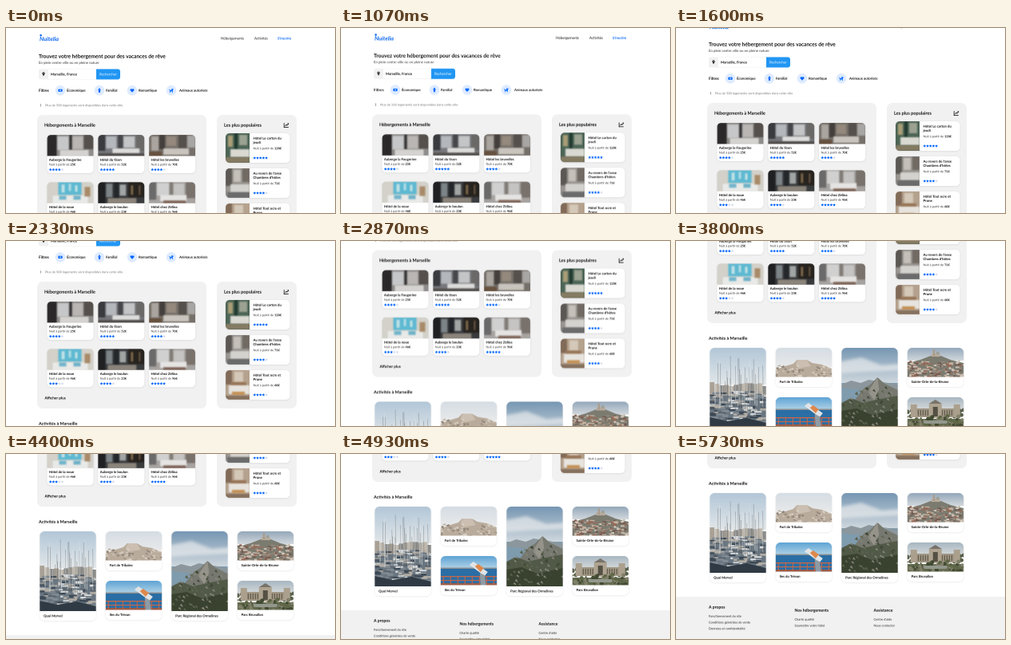
These frames come from a looping animation (412 px wide and 232 px high, 5990 ms). An HTML page with a canvas:

```html
<!DOCTYPE html>
<html lang="fr">
<head>
<meta charset="utf-8">
<title>Hébergements</title>
<style>
html, body { margin: 0; width: 100%; height: 100%; overflow: hidden; background: #fff; }
canvas { display: block; width: 412px; height: 232px; }
</style>
</head>
<body>
<canvas id="stage"></canvas>
<script>
const W = 412, H = 232, PAGE_H = 482, SCALE = 4, LOOP = 5990, STEP = 1000 / 15;
const BLUE = '#0065fc', PALE = '#deebff', GREY = '#f1f1f1', INK = '#111';

const page = document.createElement('canvas');
page.width = W * SCALE;
page.height = PAGE_H * SCALE;
const g = page.getContext('2d');
g.scale(SCALE, SCALE);

// --- helpers ---
function text(str, x, y, size = 4.3, weight = 700, color = INK, style = '') {
  g.font = `${style} ${weight} ${size}px Lato, sans-serif`;
  g.fillStyle = color;
  g.fillText(str, x, y + size * 0.33);
  return x + g.measureText(str).width;
}

function rect(color, x, y, w, h) {
  g.fillStyle = color;
  g.fillRect(x, y, w, h);
}

function round(color, x, y, w, h, r) {
  g.fillStyle = color;
  g.beginPath();
  g.roundRect(x, y, w, h, r);
  g.fill();
}

function disc(color, x, y, r) {
  g.fillStyle = color;
  g.beginPath();
  g.arc(x, y, r, 0, Math.PI * 2);
  g.fill();
}

function poly(color, ...p) {
  g.fillStyle = color;
  g.beginPath();
  for (let i = 0; i < p.length; i += 2) g.lineTo(p[i], p[i + 1]);
  g.fill();
}

function line(color, width, ...p) {
  g.strokeStyle = color;
  g.lineWidth = width;
  g.beginPath();
  for (let i = 0; i < p.length; i += 2) g.lineTo(p[i], p[i + 1]);
  g.stroke();
}

function sky(top, bottom, w, h) {
  const grad = g.createLinearGradient(0, 0, 0, h);
  grad.addColorStop(0, top);
  grad.addColorStop(1, bottom);
  rect(grad, 0, 0, w, h);
}

function card(x, y, w, h, r = 5) {
  g.save();
  g.shadowColor = 'rgba(0,0,0,.1)';
  g.shadowBlur = 2 * SCALE;
  g.shadowOffsetY = 0.5 * SCALE;
  round('#fff', x, y, w, h, r);
  g.restore();
}

function photo(x, y, w, h, radii, paint) {
  g.save();
  g.translate(x, y);
  g.beginPath();
  g.roundRect(0, 0, w, h, radii);
  g.clip();
  paint(w, h);
  g.restore();
}

// Interiors are soft-edged blocks on a base tone.
const room = (base, ...blocks) => (w, h) => {
  rect(base, 0, 0, w, h);
  g.filter = 'blur(3px)';
  for (const b of blocks) rect(...b);
};

function seeded(seed) {
  return () => (seed = (seed * 16807) % 2147483647) / 2147483647;
}

function stars(x, y, count) {
  for (let i = 0; i < 5; i++) {
    const pts = [];
    for (let k = 0; k < 10; k++) {
      const a = k * Math.PI / 5 - Math.PI / 2, r = k % 2 ? 0.95 : 1.95;
      pts.push(x + 1.8 + i * 3.7 + Math.cos(a) * r, y + Math.sin(a) * r);
    }
    poly(i < count ? BLUE : '#d5dcea', ...pts);
  }
}

function price(x, y, amount) {
  const end = text('Nuit à partir de ', x, y, 3.85, 400, '#333');
  text(amount + '€', end, y, 3.85);
}

// --- rooms ---
const hotels = [
  ['Auberge la Fougerine', 25, 4, room('#8f8d8b', ['#2a2828', 0, 0, 12, 27], ['#c6c7c8', 13, 2, 14, 17],
    ['#343233', 28, 0, 3, 19], ['#b9b6b3', 32, 2, 13, 16], ['#55504c', 46, 0, 12, 18], ['#d5d3d0', 16, 19, 36, 8])],
  ['Hôtel du tison', 52, 5, room('#77797d', ['#3a3b3f', 0, 0, 9, 20], ['#b4b7bb', 10, 2, 13, 15],
    ['#46474b', 25, 0, 6, 18], ['#c4c5c6', 32, 2, 14, 14], ['#6b6968', 48, 0, 10, 20], ['#dcdcdb', 18, 17, 34, 7], ['#54504e', 0, 23, 58, 4])],
  ['Hôtel les bruvelles', 70, 4, room('#76706a', ['#aaa59f', 3, 2, 9, 18], ['#443f3c', 13, 0, 7, 18],
    ['#94897c', 22, 2, 12, 12], ['#55504c', 37, 0, 10, 17], ['#a7a6a4', 48, 1, 10, 15], ['#c9c4bd', 18, 17, 32, 8], ['#67513f', 0, 21, 16, 6])],
  ['Hôtel de la noue', 46, 3, room('#d3d1c9', ['#5eb9d2', 14, 0, 29, 16], ['#bfe1e6', 18, 3, 4, 10],
    ['#b4dde5', 27, 2, 3, 9], ['#c8e4e6', 35, 4, 3, 8], ['#e9eae8', 7, 17, 44, 10], ['#73b5cc', 15, 17, 9, 5], ['#71b2c8', 33, 17, 9, 5], ['#a88b69', 47, 6, 7, 12])],
  ['Auberge le boulon', 23, 4, room('#393b3d', ['#1e2022', 0, 0, 9, 27], ['#7c8487', 10, 2, 8, 17],
    ['#24272a', 20, 0, 6, 23], ['#a1a5a4', 27, 3, 8, 14], ['#27231f', 38, 0, 20, 19], ['#7b664a', 41, 4, 3, 12], ['#695643', 51, 4, 2, 12], ['#8b847b', 12, 20, 36, 7])],
  ['Hôtel chez Zélina', 96, 5, room('#a6a3a0', ['#6b6a6a', 0, 0, 9, 22], ['#d0d0d0', 10, 1, 15, 16],
    ['#817b76', 26, 0, 4, 18], ['#c5c4c3', 31, 2, 13, 14], ['#79716b', 46, 0, 12, 20], ['#e5e4e2', 14, 16, 33, 8], ['#81675b', 18, 23, 28, 4])]
];

const popular = [
  ['Hôtel Le carton du', 'jeudi', 128, 5, room('#4d6556', ['#a89d77', 3, 3, 6, 14], ['#223a30', 11, 0, 4, 20],
    ['#9ba292', 17, 2, 10, 13], ['#d9d9d2', 6, 20, 24, 10], ['#857b63', 0, 30, 30, 7])],
  ["Au revers de l'anse", "Chambres d'hôtes", 71, 4, room('#98948f', ['#5b5753', 0, 0, 8, 22], ['#c4c0ba', 10, 2, 9, 15],
    ['#716a63', 21, 0, 9, 17], ['#d4d2ce', 6, 20, 24, 10], ['#6b6b6c', 2, 30, 28, 7])],
  ['Hôtel Tout ocre et', 'Prune', 68, 4, room('#b5a28e', ['#816a57', 0, 0, 8, 18], ['#d4c8b8', 11, 2, 11, 13],
    ['#987557', 6, 15, 20, 5], ['#e7e4df', 4, 19, 26, 11], ['#c49054', 8, 27, 16, 4], ['#85705d', 0, 32, 30, 5])]
];

// --- landscapes ---
function harbour(w, h) {
  const rnd = seeded(71);
  sky('#b3c7d8', '#e2e7e9', w, 46);
  rect('#697681', 0, 48, w, h);
  for (let x = 0; x < w; x += 6) {
    const top = 43 + rnd() * 6;
    rect(['#a9a196', '#c0b8ac', '#8d8c89'][x % 18 / 6], x, top, 6, 60 - top);
  }
  for (let i = 0; i < 150; i++) {
    const y = 54 + i * 0.28, len = 4 + rnd() * 9;
    round(['#d6d9da', '#818b93', '#3c4854', '#b2ada5', '#59636c'][i % 5], rnd() * 76 - 6, y, len, 1.4 + rnd() * 2, 1);
  }
  for (let i = 0; i < 42; i++) {
    const x = rnd() * w, top = 10 + rnd() * 36;
    line(i % 2 ? '#dfe2e3' : '#747b80', 0.4, x, top, x + 0.5, 66 + rnd() * 14);
  }
  poly('#303a44', 0, 87, 22, 92, 46, 88, w, 94, w, h, 0, h);
}

function rocks(w, h) {
  const rnd = seeded(19);
  sky('#d5dde4', '#e9eaeb', w, 24);
  poly('#b9ab9b', 0, 27, 12, 23, 22, 20, 27, 15, 39, 15, 46, 19, 58, 21, 70, 26, 70, h, 0, h);
  poly('#cbbfb2', 25, 20, 28, 15, 39, 15, 44, 23, 28, 26);
  for (let i = 0; i < 70; i++) {
    const x = rnd() * 76 - 4, y = 22 + rnd() * 15;
    poly(['#d8cfc4', '#918679', '#bfb2a3'][i % 3], x, y, x + 2 + rnd() * 3, y - 1, x + 4, y + 2);
  }
}

function lookout(w, h) {
  sky('#5fa4d6', '#b3d4e6', w, 16);
  rect('#8b8f91', 0, 14.5, w, 1.7);
  rect('#2a6ea5', 0, 16, w, 21);
  rect('#cb6746', 0, 25, w, 1.3);
  rect('#cb6746', 0, 30, w, 1.1);
  rect('#9b5a45', 0, 34, w, 3);
  for (let x = 3; x < w; x += 9) rect('#cb6746', x, 25, 1, 10);
  poly('#e1e4e6', 36, 11, 41, 7, 59, 20, 55, 25);
  poly('#de884c', 43, 13, 47, 10, 54, 15, 50, 20);
  poly('#8f9ba3', 49, 21, 55, 24, 57, h, 50, h);
}

function cliffs(w, h) {
  const rnd = seeded(43);
  sky('#7797b3', '#d3dbe0', w, 46);
  g.save();
  g.filter = 'blur(8px)';
  poly('rgba(232,235,237,.7)', -5, 18, 25, 12, 50, 22, 75, 20, 75, 28, 30, 30, -5, 32);
  g.restore();
  sky('#8fa8b8', '#8fa8b8', 0, 0);
  rect('#7f9bae', 0, 44, w, h);
  poly('#8b979d', 0, 46, 12, 41, 24, 44, 34, 40, w, 46, w, 58, 0, 50);
  poly('#777970', 16, 66, 27, 52, 36, 46, 45, 37, 54, 45, w, 53, w, h, 10, h);
  poly('#95938a', 33, 55, 45, 37, 47, 52, 41, 66);
  poly('#515947', 0, 69, 12, 63, 27, 69, 44, 65, w, 60, w, h, 0, h);
  poly('#39422f', 0, 79, 19, 76, 38, 84, w, 77, w, h, 0, h);
  for (let i = 0; i < 80; i++) {
    const y = 50 + rnd() * 49, left = Math.max(0, 72 - y), x = left + rnd() * (w - left);
    poly(['#3e4733', '#85857a', '#5d6450'][i % 3], x, y, x + 2, y - 2, x + 4, y + 2);
  }
}

function basilica(w, h) {
  const rnd = seeded(87);
  sky('#94a8bb', '#d2d8dd', w, 16);
  poly('#7b7b70', 0, 19, 16, 15, 29, 10, 42, 10, 54, 15, w, 19, w, h, 0, h);
  rect('#b9ac9c', 30, 7, 11, 4);
  rect('#a99c8d', 32, 2, 2.5, 8);
  disc('#9ca09a', 38, 6.5, 2);
  for (let i = 0; i < 150; i++) {
    const y = 16 + i * 0.14, x = rnd() * 74 - 4;
    rect(['#956b59', '#c5b4a3', '#70564d', '#a18d80', '#d3c8bd'][i % 5], x, y, 2 + rnd() * 4, 1 + rnd() * 1.6);
  }
}

function palace(w, h) {
  const rnd = seeded(55);
  sky('#a8b7c2', '#dcdfdf', w, 18);
  for (let i = 0; i < 30; i++) disc('#59604b', rnd() * w, 16 + rnd() * 8, 2.5);
  rect('#9f9582', 5, 14, 60, 11);
  for (let x = 7; x < 64; x += 3) rect('#645e4f', x, 16, 1.2, 7);
  rect('#aea390', 27, 8, 16, 18);
  poly('#78736a', 27, 8, 35, 3, 43, 8);
  rect('#545044', 32, 12, 6, 12);
  rect('#aba08d', 4, 9, 8, 16);
  rect('#aba08d', 58, 9, 8, 16);
  rect('#666c51', 0, 27, w, 10);
  for (let i = 0; i < 60; i++) {
    disc(['#424b33', '#5d6646', '#81806a'][i % 3], rnd() * w, 23 + rnd() * 13, 1 + rnd() * 1.8);
  }
  round('#93988d', 20, 29, 30, 4, 2);
}

// --- icons ---
function pin(x, y) {
  disc(INK, x, y - 0.8, 1.6);
  poly(INK, x - 1.5, y - 0.3, x + 1.5, y - 0.3, x, y + 2.6);
  disc(GREY, x, y - 0.8, 0.6);
}

const icons = [
  (x, y) => {
    round(BLUE, x - 2.6, y - 1.6, 5.2, 3.2, 0.5);
    disc(PALE, x, y, 0.8);
  },
  (x, y) => {
    disc(BLUE, x, y - 1.7, 1);
    poly(BLUE, x - 2.2, y - 1.2, x, y - 0.4, x + 2.2, y - 1.2, x + 1, y + 0.6, x + 1.1, y + 2.7, x - 1.1, y + 2.7, x - 1, y + 0.6);
  },
  (x, y) => {
    disc(BLUE, x - 1.15, y - 0.7, 1.35);
    disc(BLUE, x + 1.15, y - 0.7, 1.35);
    poly(BLUE, x - 2.35, y - 0.1, x + 2.35, y - 0.1, x, y + 2.5);
  },
  (x, y) => {
    rect(BLUE, x - 1.8, y - 0.5, 3.6, 1.6);
    rect(BLUE, x - 1.8, y + 1, 0.9, 1.6);
    rect(BLUE, x + 0.9, y + 1, 0.9, 1.6);
    poly(BLUE, x + 0.4, y - 2.5, x + 2.8, y - 1.4, x + 1.8, y, x + 0.4, y);
    line(BLUE, 0.6, x - 1.7, y, x - 2.7, y - 1.4);
  }
];

// --- page sections ---
function drawTop() {
  disc('#0a66f0', 43.6, 9.2, 1.3);
  text('Nuitelia', 42, 13.8, 7.2, 700, '#0a66f0', 'italic');
  text('Hébergements', 269, 13, 4.5, 400);
  text('Activités', 311, 13, 4.4, 400);
  text("S'inscrire", 340, 13, 4.3, 700, BLUE);

  text('Trouvez votre hébergement pour des vacances de rêve', 41, 35.5, 6.58);
  text('En plein centre ville ou en pleine nature', 41, 43.5, 4.38, 400, '#333');

  round('#ececec', 41, 51.5, 90, 13, 3);
  round('#fff', 41.4, 51.9, 89, 12.2, 2.7);
  round(GREY, 41, 51.5, 12, 13, [3, 0, 0, 3]);
  pin(47, 57.8);
  text('Marseille, France', 56, 58, 4.4);
  round('#2196f3', 113, 51.5, 30, 13, [0, 3, 3, 0]);
  text('Rechercher', 117, 58, 4.4, 400, '#fff');

  text('Filtres', 41, 78.5, 4.6);
  [['Économique', 68, 76], ['Familial', 117, 125], ['Romantique', 158, 166], ['Animaux autorisés', 207, 217]]
    .forEach(([label, cx, x], i) => {
      disc(PALE, cx, 78.3, 6.3);
      icons[i](cx, 78.3);
      text(label, x, 78.3, 4.3);
    });

  text('i', 43, 97, 4.6, 700, '#555');
  text('Plus de 500 logements sont disponibles dans cette ville', 49, 97, 4.05, 400, '#777');
}

function drawHotels() {
  round(GREY, 39, 109, 212, 159, 7);
  text('Hébergements à Marseille', 48, 122, 5.5);
  hotels.forEach(([name, cost, rating, paint], i) => {
    const x = 51.5 + (i % 3) * 63.8, y = 134 + (i > 2 ? 59.3 : 0);
    card(x, y, 58, 48);
    photo(x, y, 58, 26.5, [5, 5, 0, 0], paint);
    text(name, x + 2.4, y + 31.4, 4.3);
    price(x + 2.4, y + 37.2, cost);
    stars(x + 2.4, y + 43.6, rating);
  });
  text('Afficher plus', 48.5, 255, 4.7);
}

function drawPopular() {
  round(GREY, 264, 109, 100, 159, 7);
  text('Les plus populaires', 273, 122, 5.6);
  line(INK, 0.8, 348.2, 119.2, 348.2, 124.6, 353.8, 124.6);
  line(INK, 0.8, 349.5, 123, 351, 121.2, 352, 122.1, 353.8, 119.8);
  poly(INK, 352.2, 119.3, 354.1, 119.3, 354.1, 121.2);
  popular.forEach(([first, second, cost, rating, paint], i) => {
    const y = 132 + i * 44;
    card(275, y, 80.5, 37);
    photo(275, y, 30, 37, [5, 0, 0, 5], paint);
    text(first, 309.5, y + 6.4, 4.3);
    text(second, 309.5, y + 11.7, 4.3);
    price(309.5, y + 19, cost);
    stars(309.5, y + 31, rating);
  });
}

function drawActivities() {
  text('Activités à Marseille', 41, 287, 5.4);
  const tall = [100, 112, 106], low = [36.5, 49, 42.6];
  [
    ['Quai Morvel', 42.3, 299, tall, harbour],
    ['Fort de Tribalec', 124.8, 299, low, rocks],
    ['Iles du Trévan', 124.8, 361, low, lookout],
    ['Parc Régional des Ormelines', 207.3, 299, tall, cliffs],
    ['Sainte-Orle-de-la-Brume', 289.8, 299, low, basilica],
    ['Parc Bruvallon', 289.8, 361, low, palace]
  ].forEach(([name, x, y, [imageH, cardH, labelY], paint]) => {
    card(x, y, 70.4, cardH, 6);
    photo(x, y, 70.4, imageH, [6, 6, 0, 0], paint);
    text(name, x + 4.8, y + labelY, 4.25);
  });
}

function drawFooter() {
  rect(GREY, 0, 429, W, 53);
  [
    [41, 442, 'A propos', 'Fonctionnement du site', 'Conditions générales de vente', 'Données et confidentialité'],
    [148.5, 446, 'Nos hébergements', 'Charte qualité', 'Soumettre votre hôtel'],
    [247.5, 446, 'Assistance', "Centre d'aide", 'Nous contacter']
  ].forEach(([x, y, title, ...links]) => {
    text(title, x, y, 5.1);
    links.forEach((link, i) => text(link, x, y + 11.5 + i * 7.7, 3.95, 400, '#222'));
  });
}

rect('#fff', 0, 0, W, PAGE_H);
drawTop();
drawHotels();
drawPopular();
drawActivities();
drawFooter();

// --- scrolling: smooth curve through [time, offset] ---
const knots = [[935, 0], [1600, 15], [2333, 58], [3333, 133], [3800, 165], [4400, 202], [5267, 250]];

function slope(i) {
  if (i === 0) return 0;
  if (i === knots.length - 1) return 0.045;
  const [a, , b] = knots.slice(i - 1, i + 2);
  return (b[1] - a[1]) / (b[0] - a[0]);
}

function scrollAt(t) {
  if (t <= knots[0][0]) return 0;
  const i = knots.findIndex(k => k[0] > t) - 1;
  if (i < 0) return 250;
  const [t0, y0] = knots[i], [t1, y1] = knots[i + 1];
  const d = t1 - t0, u = (t - t0) / d, v = 1 - u;
  return v * v * (1 + 2 * u) * y0 + u * u * (3 - 2 * u) * y1
    + d * u * v * (v * slope(i) - u * slope(i + 1));
}

const stage = document.getElementById('stage');
const dpr = window.devicePixelRatio || 1;
stage.width = W * dpr;
stage.height = H * dpr;
const ctx = stage.getContext('2d');
ctx.scale(dpr, dpr);
ctx.imageSmoothingQuality = 'high';

function frame() {
  const t = performance.now() % LOOP;
  const stepped = Math.floor((t + 4) / STEP) * STEP;
  ctx.fillStyle = '#fff';
  ctx.fillRect(0, 0, W, H);
  ctx.drawImage(page, 0, -scrollAt(stepped), W, PAGE_H);
  requestAnimationFrame(frame);
}
frame();
</script>
</body>
</html>
```
